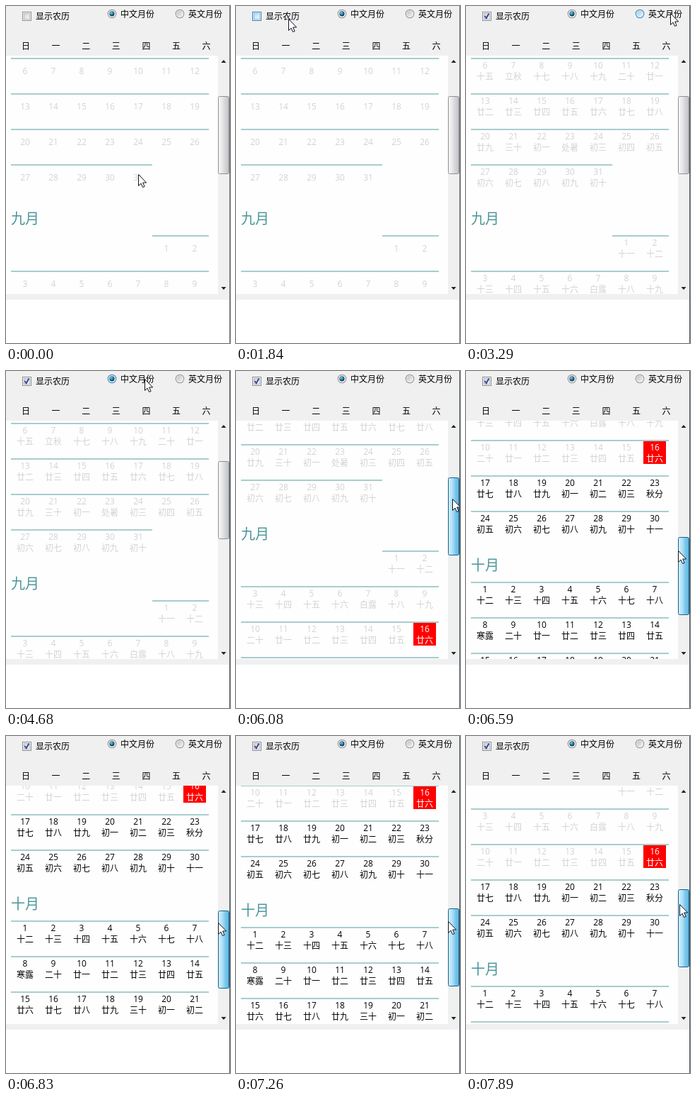
An HTML page with a canvas that plays this animation: 317 px wide and 475 px high, repeating every 8000 ms.

```html
<!DOCTYPE html>
<html lang="zh-CN">
<head>
<meta charset="utf-8">
<title>日历</title>
<style>
html, body { margin: 0; width: 100%; height: 100%; overflow: hidden; background: #fff; }
canvas { display: block; }
</style>
</head>
<body>
<canvas id="stage" width="317" height="475"></canvas>
<script>
const ctx = document.getElementById('stage').getContext('2d');
const LOOP = 8000;
const STEP = 60;
const CJK = '"Noto Sans CJK SC", "Noto Sans CJK", "Noto Sans CJK JP", sans-serif';
const NUM = '"Open Sans", "Noto Sans", sans-serif';
const VIEW = { top: 70, bottom: 406, width: 300 };
const ROW = 50, COL = 40, LEFT = 7;

const YEAR = 2017;
const EPOCH = Date.UTC(YEAR, 7, 1);
const DIGITS = '一二三四五六七八九十';
const MONTH_NAMES = { 7: ['八月', 'August'], 8: ['九月', 'September'], 9: ['十月', 'October'] };
const TERMS = ['立秋', '处暑', '白露', '秋分', '寒露', '霜降'];
const dayNumber = (m, d) => Math.round((Date.UTC(YEAR, m, d) - EPOCH) / 864e5);
const TODAY = dayNumber(8, 16);

const linear = u => u;
const easeIn = u => u ** 2.4;
const easeOut = u => 1 - (1 - u) ** 2.4;

// Moves advance in steps: { from, to (ms), end (values), ease }
const move = (from, to, end, ease = linear) => ({ from, to, end, ease });
const POINTER = [
  move(310, 490, [222, 182]),
  move(800, 1220, [75, 14]),
  move(1840, 1960, [73, 26]),
  move(2690, 2930, [290, 8]),
  move(3170, 3410, [288, 12]),
  move(3870, 4560, [196, 11]),
  move(5050, 5050, [198, 10]),
  move(5230, 5410, [297, 130])
];
const SCROLL = [
  move(5660, 6410, [246], easeIn),
  move(6470, 6890, [364], easeOut),
  move(7140, 7490, [292], easeIn),
  move(7890, 7890, [271])
];

function track(moves, start, t) {
  return moves.reduce((pos, { from, to, end, ease }) => {
    if (t < from) return pos;
    const gone = Math.floor((t - from) / STEP) * STEP + STEP;
    const u = t >= to ? 1 : Math.min(1, gone / (to - from + STEP));
    return pos.map((p, i) => p + (end[i] - p) * ease(u));
  }, start).map(Math.round);
}

// The dragging hand lags behind the thumb and drifts left on the way down
function pointerAt(t, offset) {
  if (t >= SCROLL[0].from) return [Math.round(307 - offset / 50), Math.round(160 + offset * 0.285)];
  return track(POINTER, [187, 237], t);
}

function rect(x, y, w, h, fill) {
  ctx.fillStyle = fill;
  ctx.fillRect(x, y, w, h);
}

function text(str, x, y, { color = '#000', font = CJK, size = 12, weight = 400, align = 'left' } = {}) {
  ctx.font = `${weight} ${size}px ${font}`;
  ctx.textAlign = align;
  ctx.fillStyle = color;
  ctx.fillText(str, x, y);
}

function gradient(x0, y0, x1, y1, colors) {
  const g = ctx.createLinearGradient(x0, y0, x1, y1);
  colors.forEach((c, i) => g.addColorStop(i / (colors.length - 1), c));
  return g;
}

function poly(points, fill, stroke) {
  ctx.beginPath();
  points.forEach(([x, y]) => ctx.lineTo(x, y));
  ctx.closePath();
  ctx.fillStyle = fill;
  ctx.fill();
  if (!stroke) return;
  ctx.strokeStyle = stroke;
  ctx.lineWidth = 1;
  ctx.stroke();
}

function disc(x, y, r, fill) {
  ctx.beginPath();
  ctx.arc(x, y, r, 0, Math.PI * 2);
  ctx.fillStyle = fill;
  ctx.fill();
}

// Lunar day name from the mean lengths of the moon's cycle and the solar terms
function lunar(n) {
  const term = Math.round((n - 6.45) / 15.36);
  if (Math.floor(6.95 + term * 15.36) === n && TERMS[term]) return TERMS[term];
  const moon = k => Math.floor(29.53 * k - 8.5);
  let k = 0;
  while (moon(k + 1) <= n) k++;
  const d = n - moon(k) + 1;
  if (d === 20) return '二十';
  if (d === 30) return '三十';
  return (d <= 10 ? '初' : d < 20 ? '十' : '廿') + DIGITS[(d - 1) % 10];
}

function drawDay(n, d, x, y, showLunar) {
  const today = n === TODAY;
  const color = today ? '#fff' : n < TODAY ? '#d3d3d3' : '#000';
  rect(x, y, COL, 2, '#a9cdcd');
  if (today) rect(x + 4, y + 2, 32, 32, '#f00');
  text(d, x + COL / 2, y + (showLunar ? 15 : 23), { color, font: NUM, align: 'center' });
  if (showLunar) text(lunar(n), x + COL / 2, y + 31, { color, align: 'center' });
}

function drawMonths(offset, showLunar, english) {
  let top = 23 - offset;
  for (const m in MONTH_NAMES) {
    const first = new Date(Date.UTC(YEAR, m, 1)).getUTCDay();
    const days = new Date(Date.UTC(YEAR, +m + 1, 0)).getUTCDate();
    const [zh, en] = MONTH_NAMES[m];
    text(english ? en : zh, LEFT, top - 16,
      { color: '#4a9698', font: english ? NUM : CJK, size: 20, weight: 300 });
    for (let d = 1; d <= days; d++) {
      const cell = first + d - 1;
      drawDay(dayNumber(m, d), d, LEFT + cell % 7 * COL, top + Math.floor(cell / 7) * ROW, showLunar);
    }
    top += (Math.ceil((first + days) / 7) + 1) * ROW;
  }
}

function drawCheckbox(hover, checked) {
  rect(23, 8, 13, 13, hover ? '#3c7fb1' : '#8e8f8f');
  rect(24, 9, 11, 11, hover ? '#def1fc' : '#f4f4f4');
  rect(25, 10, 9, 9, hover ? '#8fc4e6' : '#b4b9bf');
  rect(26, 11, 7, 7, gradient(26, 11, 33, 18, hover ? ['#b5ddf5', '#eef8fe'] : ['#d2d6da', '#f6f6f6']));
  if (!checked) return;
  ctx.beginPath();
  ctx.moveTo(26.5, 14);
  ctx.lineTo(28.7, 17.2);
  ctx.lineTo(32.5, 10.5);
  ctx.strokeStyle = '#37469b';
  ctx.lineWidth = 1.9;
  ctx.stroke();
}

function drawRadio(x, label, hover, on) {
  disc(x, 11, 6.3, hover ? '#3c7fb1' : '#8e8f8f');
  disc(x, 11, 5.3, hover ? '#def1fc' : '#f4f4f4');
  disc(x, 11, 4.4, gradient(x - 4, 7, x + 4, 15, hover ? ['#9ccdea', '#eaf6fd'] : ['#bfc3c7', '#f2f2f2']));
  if (on) {
    disc(x, 11, 3.5, '#14445f');
    disc(x - 0.3, 10.6, 2.4, gradient(x - 2, 8, x + 2, 13, ['#c8f2ff', '#2a9fd0', '#15688f']));
  }
  text(label, x + 12, 16);
}

function drawArrow(y, dir) {
  poly([[304.5, y], [308, y + 4 * dir], [311.5, y]], '#222');
}

function drawScrollbar(offset, active) {
  rect(300, VIEW.top, 16, VIEW.bottom - VIEW.top, '#f0f0f0');
  drawArrow(80, -1);
  drawArrow(396, 1);
  const y = 127 + Math.round(offset / 3.045);
  ctx.beginPath();
  ctx.roundRect(300.5, y + 0.5, 15, 109, 2);
  ctx.fillStyle = gradient(301, 0, 315, 0, active
    ? ['#d3effb', '#b5e2f7', '#7cc8ec', '#5cb6e2']
    : ['#f6f6f6', '#e9e9eb', '#d3d4d7', '#c2c3c7']);
  ctx.fill();
  ctx.strokeStyle = active ? '#17618b' : '#8f8f8f';
  ctx.lineWidth = 1;
  ctx.stroke();
}

function drawPointer(x, y) {
  ctx.save();
  ctx.translate(x + 0.5, y + 0.5);
  poly([[0, 0], [0, 16], [3.6, 12.6], [6, 18], [8.6, 17], [6.2, 11.5], [11.2, 11.5]], '#fff', '#10101c');
  ctx.restore();
}

function draw(t) {
  const [offset] = track(SCROLL, [0], t);
  const [px, py] = pointerAt(t, offset);
  const showLunar = t >= 2290;
  const english = t >= 3560 && t < 4680;
  const dragging = t >= SCROLL[0].from;
  const over = (a, b) => px >= a && px <= b && py < 27;
  const height = VIEW.bottom - VIEW.top;

  rect(0, 0, 317, 475, '#fff');
  rect(0, 0, 317, 414, '#f0f0f0');
  rect(0, VIEW.top, VIEW.width, height, '#fefefe');

  ctx.save();
  ctx.beginPath();
  ctx.rect(0, VIEW.top, VIEW.width, height);
  ctx.clip();
  drawMonths(offset, showLunar, english);
  ctx.restore();

  drawCheckbox(over(23, 90), showLunar);
  text('显示农历', 42, 19);
  drawRadio(150, '中文月份', over(144, 211), !english);
  drawRadio(246, '英文月份', over(240, 306), english);
  [...'日一二三四五六'].forEach((c, i) => text(c, 28 + i * 42.6, 61, { align: 'center' }));

  drawScrollbar(offset, dragging);
  rect(316, 0, 1, 475, t < 2110 ? '#777' : '#4a5a68');
  drawPointer(px, py);
}

function tick(now) {
  draw(now % LOOP);
  requestAnimationFrame(tick);
}
draw(0);
requestAnimationFrame(tick);
</script>
</body>
</html>
```
